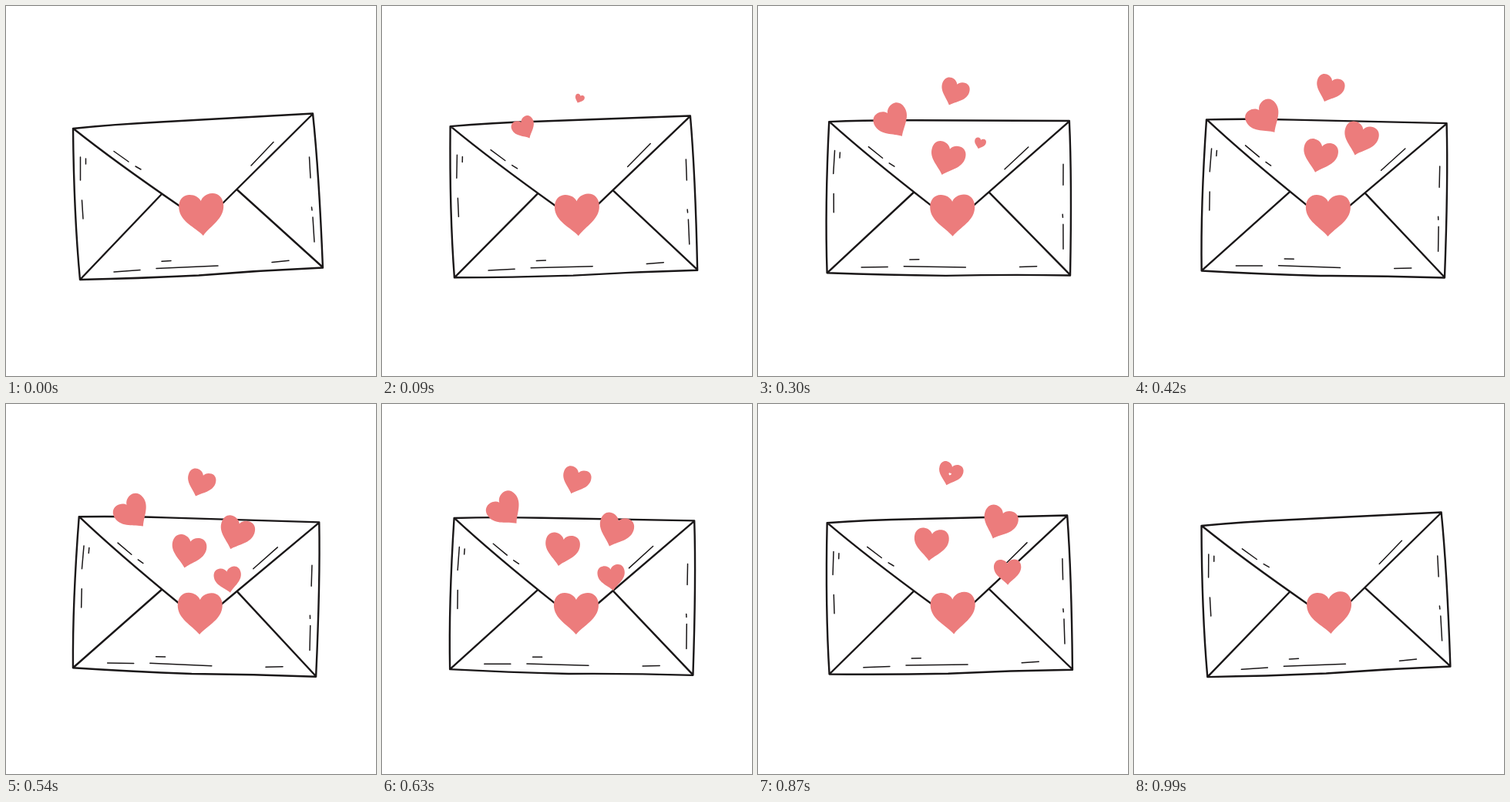
Animation of 480x480 px, one loop 1.02 s. Source, as an HTML page:

```html
<!DOCTYPE html>
<html lang="en">
<head>
<meta charset="utf-8">
<title>Love letter</title>
<style>
  html, body { margin: 0; width: 100%; height: 100%; overflow: hidden; background: #fff; }
  svg { display: block; width: 100%; height: 100%; }
</style>
</head>
<body>
<svg viewBox="0 0 480 480">
  <g id="letter" fill="none" stroke="#1a1718" stroke-linecap="round" stroke-linejoin="round">
    <path stroke-width="2.4" d="M87 159 Q140 153.5 200 150.5 T398 139.5 Q406 215 411 339.5
      Q330 343 250 349.5 Q170 353.5 96 355 Q88 270 87 159
      M88 159.500 Q140 201 226 260 M398 140 L281 256 M96 355 L202 244 M300 238.500 L411 339"/>
    <path stroke-width="1.5" d="M140 188.500L159 202M168 208L175 212M347 176.500L318 207
      M96.500 196V226M103.500 198V205M98.500 252L100 276M393.500 196L395 223
      M396.500 261L397 265M398 274L400 306M140 345L174 342.500M202 331.300L214 330.500
      M195 340.500L275 337M345 332.500L367 330.300"/>
    <path id="seal" stroke="none" fill="#ec7c7c" transform="translate(254 271) rotate(-4)"/>
  </g>
  <g id="hearts" fill="#ec7c7c" fill-rule="evenodd"></g>
</svg>
<script>
const LOOP = 1020, STEP = 30, POP = 90;
const letter = document.getElementById('letter');
const group = document.getElementById('hearts');

// Upright heart, 58 by 54 units, around its centre
const HALF = [[-10, 15, -29, 7, -29, -11], [-29, -21, -23, -27, -15, -27], [-8, -27, -2, -23, 0, -18]];
const BACK = [[2, -23, 8, -27, 15, -27], [23, -27, 29, -21, 29, -11], [29, 7, 10, 15, 0, 27]];
const heart = s => 'M0 ' + 27 * s +
  [...HALF, ...BACK].map(c => 'C' + c.map(v => v * s).join(' ')).join('') + 'Z';

document.getElementById('seal').setAttribute('d', heart(1));

// Position, angle and their rates per ms are given at time "at"
const floats = [
  { at: 180, x: 180.9, y: 155.6, vx: -0.0439, vy: -0.038, a: -30, va: -0.021, s: 0.78, from: 30, to: 750 },
  { at: 180, x: 255.2, y: 117, vx: -0.009, vy: -0.0376, a: 22, va: -0.006, s: 0.635, from: 60, to: 840 },
  { at: 420, x: 240.5, y: 195.6, vx: -0.036, vy: -0.0287, a: 15, va: -0.018, s: 0.775, from: 210, to: 880 },
  { at: 420, x: 293, y: 173.5, vx: 0.0436, vy: -0.041, a: 18, va: 0.009, s: 0.775, from: 270, to: 885 },
  { at: 540, x: 288.3, y: 228.4, vx: 0.1075, vy: -0.031, a: -9.5, va: 0.025, s: 0.61, from: 430, to: 890 }
];
for (const f of floats) {
  f.node = document.createElementNS('http://www.w3.org/2000/svg', 'path');
  group.appendChild(f.node);
}

const clamp = v => Math.min(1, Math.max(0, v));

function drawFloat(f, t) {
  const grow = clamp((t - f.from) / POP);
  const leave = clamp((t - f.to) / POP);
  const shown = grow > 0 && leave < 1;
  f.node.style.display = shown ? '' : 'none';
  if (!shown) return;
  const d = t - f.at;
  // On leaving, the heart shrinks while a hole opens in it
  const hole = leave > 0 ? heart(0.6 * leave ** 1.7) : '';
  f.node.setAttribute('d', heart(grow * (1 - 0.4 * leave)) + hole);
  f.node.setAttribute('transform',
    `translate(${f.x + f.vx * d} ${f.y + f.vy * d}) rotate(${f.a + f.va * d}) scale(${f.s})`);
}

function draw(now) {
  const t = Math.floor((now % LOOP) / STEP) * STEP;
  const u = 1 - Math.abs(t / (LOOP / 2) - 1);
  const tilt = 5.1 * (1.2 * u - 0.2 * u ** 3);
  letter.setAttribute('transform', `rotate(${tilt} 240 243)`);
  for (const f of floats) drawFloat(f, t);
}

const start = performance.now();
function tick() {
  draw(performance.now() - start);
  requestAnimationFrame(tick);
}
tick();
</script>
</body>
</html>
```
